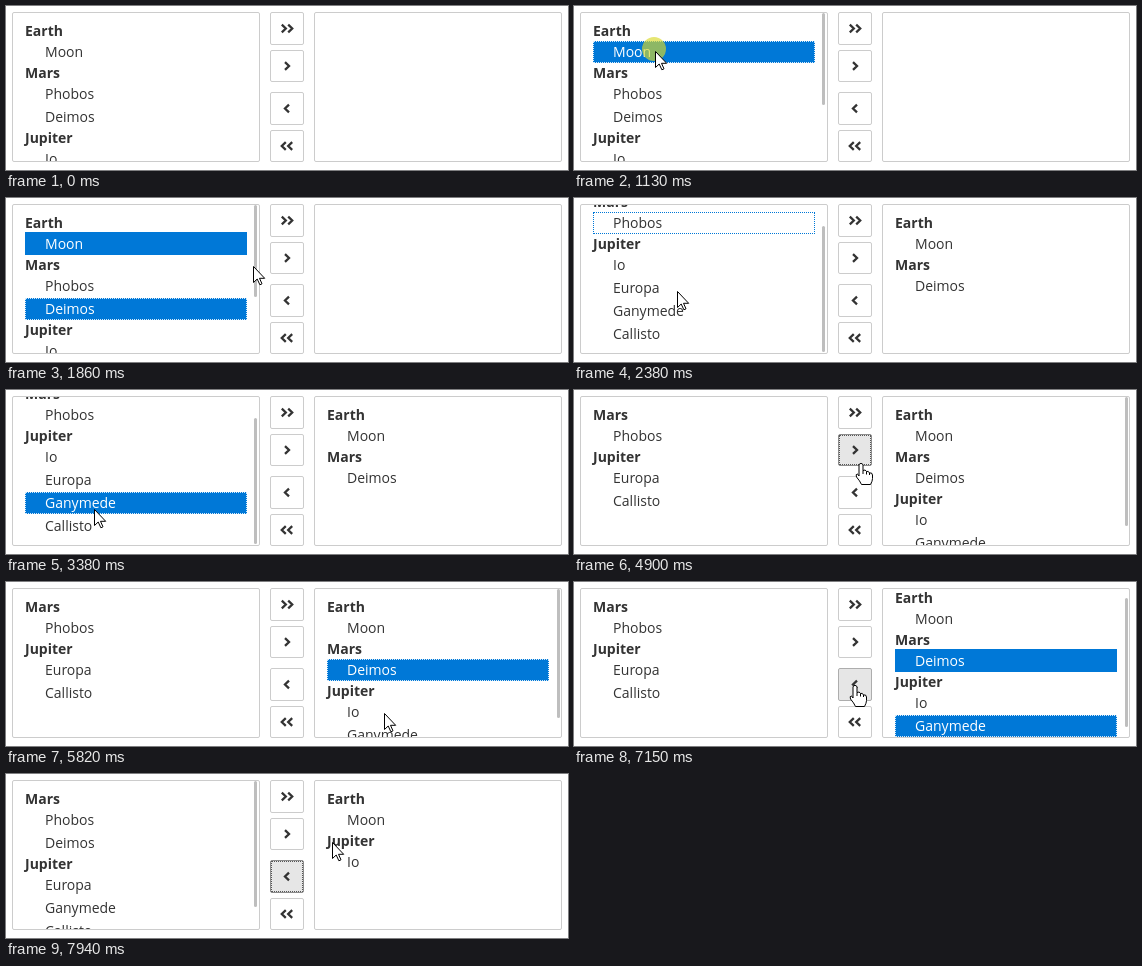
These frames come from a looping animation (562x164 px, 8000 ms). An HTML page:

```html
<!DOCTYPE html>
<html lang="en">
<head>
<meta charset="utf-8">
<title>Dual list box</title>
<style>
html, body { margin: 0; width: 100%; height: 100%; overflow: hidden; background: #fff; }
#stage { position: relative; width: 562px; height: 164px; overflow: hidden;
  font: 14px/22px "Open Sans", sans-serif; color: #333; }
#stage div { position: absolute; box-sizing: border-box; white-space: nowrap; }
#stage .panel { top: 6px; width: 248px; height: 150px; border: 1px solid #ccc; border-radius: 2px; overflow: hidden; }
#stage .row { left: 12px; width: 222px; height: 22px; padding-left: 20px; }
#stage .label { padding-left: 0; font-weight: 700; }
#stage .sel { background: #0078d7; color: #fff; box-shadow: 0 -1px #0078d7; }
#stage .focus { outline: 1px dotted #0078d7; outline-offset: -1px; }
#stage .sel.focus { outline-color: #d5eafa; box-shadow: none; }
#stage .thumb { left: 241px; width: 3px; border-radius: 2px; background: #bebebe; }
#stage .panel + .panel .thumb { left: 242px; }
#stage .btn { left: 264px; width: 34px; border: 1px solid #ccc; border-radius: 2px; background: #fff; }
#stage .btn.on { background: #e6e6e6; border-color: #adadad; }
#stage .btn.held { border-color: #8c8c8c; outline: 1px dotted #555; outline-offset: -2px; }
.btn svg, #pointer { position: absolute; left: 0; top: 0; }
#pointer { z-index: 2; }
</style>
</head>
<body>
<div id="stage">
  <div class="panel" style="left:6px"><div class="list"></div><div class="thumb"></div></div>
  <div class="panel" style="left:308px"><div class="list"></div><div class="thumb"></div></div>
  <svg id="pointer" width="562" height="164">
    <g id="cursor">
      <circle id="halo" cx="-1" cy="-2" r="12" fill="#d8d828" fill-opacity=".65"/>
      <path id="arrow" d="M.5 .5V16.500L4.200 13 6.900 18.800 9 17.800 6.500 12.300H11.700Z" fill="#fff" stroke="#000"/>
      <g id="hand" stroke="#000" stroke-linejoin="round">
        <path d="M-2 1.500Q0-1 2 1.500V7.500Q4.500 6 5.500 8.500 7.500 7.500 8.500 10 11 9 11.500 12V15.500Q11.500 18 9.500 21.500H.5Q-1 18-4.500 14-5.500 11-3.800 11-3 11-2 13Z" fill="#fff"/>
        <path d="M2 7.500V11M5.500 8.500V11.500M8.500 10V12" fill="none"/>
      </g>
    </g>
  </svg>
</div>
<script>
const LOOP = 8000, VIEW = 148, MOVE_DELAY = 140;
const planets = {
  Earth: ['Moon'],
  Mars: ['Phobos', 'Deimos'],
  Jupiter: ['Io', 'Europa', 'Ganymede', 'Callisto']
};

// time, what is clicked; "focus" only moves the keyboard focus
const actions = [
  [1130, 'Moon'], [1600, 'Deimos'], [2000, '>'],
  [2250, 'Phobos', 'focus'],
  [2770, 'Ganymede'], [3790, 'Io'], [4500, '>'],
  [5680, 'Deimos'], [6400, 'Ganymede'], [7480, '<']
];

// Pointer stops: arrive, leave, x, y
const stops = [
  [0, 400, 367, 148],
  [880, 880, 130, 100],
  [1060, 1200, 81, 45],
  [1390, 1520, 101, 76],
  [1590, 1670, 88, 108],
  [1930, 2060, 281, 60],
  [2370, 2450, 103, 93],
  [2700, 3110, 77, 103],
  [3300, 3300, 94, 128],
  [3570, 3700, 66, 85],
  [3780, 3850, 56, 67],
  [4160, 4240, 243, 79],
  [4440, 5330, 287, 73],
  [5640, 5740, 365, 90],
  [5815, 5885, 378, 131],
  [6160, 6600, 384, 145],
  [7140, 7480, 281, 103],
  [7930, LOOP, 326, 68]
];

// Wheel turns for the left and right list
const wheels = [{ from: 2250, to: 2370, by: 21 }, { from: 6340, to: 6430, by: 9 }];

const $ = id => document.getElementById(id);
const panels = [...document.querySelectorAll('.panel')].map(el => ({
  left: el.offsetLeft, list: el.children[0], thumb: el.children[1], html: '', height: 0
}));
const ramp = (t, a, b) => Math.min(1, Math.max(0, (t - a) / (b - a)));
const smooth = p => p * p * (3 - 2 * p);

const buttons = ['>>', '>', '<', '<<'].map((name, i) => {
  const top = 6 + 38 * i + (i > 1 ? 4 : 0) - (i > 2 ? 0 : 0) * 1;
  const height = 33 - i % 2;
  const dir = name[0] === '>' ? 1 : -1;
  const mid = height / 2 - 1;
  let d = '';
  for (let n = 0; n < name.length; n++) {
    const x = 16 + (n - (name.length - 1) / 2) * 6.4;
    d += `M${x - 2 * dir} ${mid - 3.8}l${4 * dir} 3.800l${-4 * dir} 3.800`;
  }
  const el = document.createElement('div');
  el.className = 'btn';
  el.style.cssText = `top:${top}px;height:${height}px`;
  el.innerHTML = `<svg width="32" height="31"><path d="${d}" fill="none" stroke="#333" stroke-width="2.300"/></svg>`;
  $('stage').appendChild(el);
  return { el, name, top, height };
});

// Replay every action up to time t
function stateAt(t) {
  const s = { right: new Set(), picked: new Set(), focus: '', movedAt: 0, moves: 0 };
  for (const [time, what, kind] of actions) {
    if (t < time) break;
    s.focus = what;
    if (what === '>' || what === '<') {
      if (t < time + MOVE_DELAY) break;
      s.picked.forEach(moon => what === '>' ? s.right.add(moon) : s.right.delete(moon));
      s.picked.clear();
      s.movedAt = time + MOVE_DELAY;
      s.moves++;
    } else if (!kind) {
      s.picked.add(what);
    }
  }
  return s;
}

function fill(panel, side, s) {
  let html = '', y = 7;
  const add = (name, cls) => {
    html += `<div class="row ${cls}" style="top:${y}px">${name}</div>`;
  };
  for (const [planet, moons] of Object.entries(planets)) {
    const here = moons.filter(m => s.right.has(m) === (side === 1));
    if (!here.length) continue;
    add(planet, 'label');
    y += 21;
    here.forEach((m, i) => {
      add(m, (s.picked.has(m) ? 'sel ' : '') + (s.focus === m ? 'focus' : ''));
      y += i < here.length - 1 ? 23 : 21;
    });
  }
  panel.height = y + 14;
  if (html !== panel.html) panel.list.innerHTML = panel.html = html;
}

function pointerAt(t) {
  const n = stops.findIndex(s => s[1] > t);
  const b = stops[n], a = stops[n - 1] || b;
  const p = a === b ? 0 : smooth(ramp(t, a[1], b[0]));
  return [2, 3].map(i => Math.round(a[i] + (b[i] - a[i]) * p));
}

function draw(t) {
  const s = stateAt(t);
  const [x, y] = pointerAt(t);
  const present = t >= stops[0][1];

  panels.forEach((panel, i) => {
    fill(panel, i, s);
    const { from, to, by } = wheels[i];
    const top = from > s.movedAt ? Math.round(by * ramp(t, from, to)) : 0;
    const inside = present && x >= panel.left && x < panel.left + 248;
    const bar = panel.height > VIEW && (inside || s.moves > 1);
    panel.list.style.top = -top + 'px';
    panel.thumb.style.cssText =
      `top:${top}px;height:${Math.round(VIEW * VIEW / panel.height)}px;display:${bar ? 'block' : 'none'}`;
  });

  let over = false;
  for (const { el, name, top, height } of buttons) {
    const hover = present && x >= 264 && x < 298 && y >= top && y < top + height;
    over = over || hover;
    el.classList.toggle('on', hover || s.focus === name);
    el.classList.toggle('held', s.focus === name);
  }

  const clicking = actions.some(([time, , kind]) => !kind && t >= time - 70 && t < time + 60);
  $('cursor').setAttribute('transform', `translate(${x} ${y})`);
  $('cursor').style.display = present ? '' : 'none';
  $('arrow').style.display = over ? 'none' : '';
  $('hand').style.display = over ? '' : 'none';
  $('halo').style.display = clicking ? '' : 'none';
}

const start = performance.now();
function tick(now) {
  draw(Math.max(0, now - start) % LOOP);
  requestAnimationFrame(tick);
}
draw(0);
requestAnimationFrame(tick);
</script>
</body>
</html>
```
